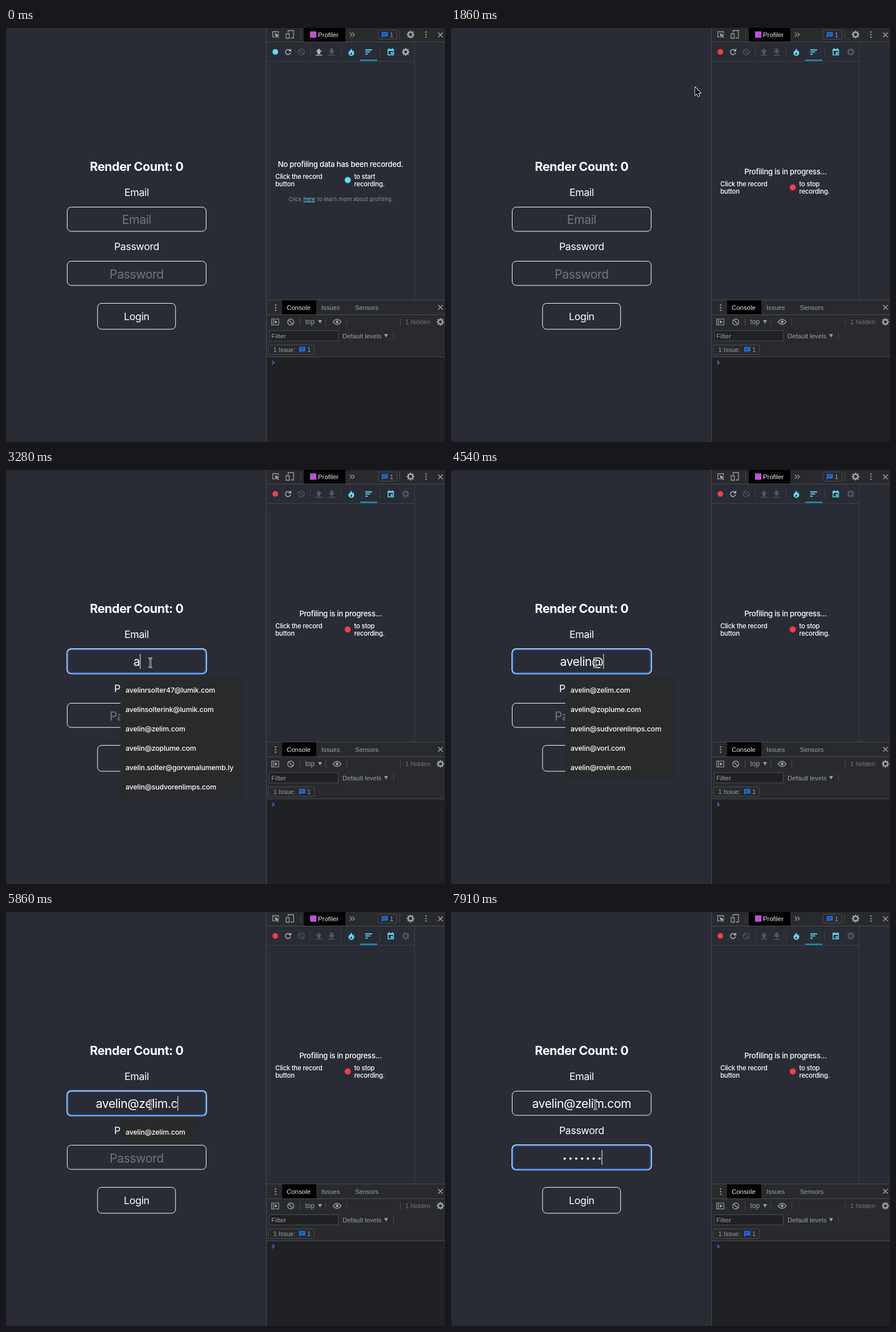
These frames come from a looping animation (771x727 px, 8 s). An HTML page with a canvas:

```html
<!DOCTYPE html>
<html lang="en">
<head>
<meta charset="utf-8">
<title>Login form profiling</title>
<style>
html, body { margin: 0; width: 100%; height: 100%; overflow: hidden; background: #292c34; }
canvas { display: block; }
</style>
</head>
<body>
<canvas id="stage" width="771" height="727"></canvas>
<script>
const c = document.getElementById('stage').getContext('2d');
const LOOP = 8000, MID = 229.4;
const UI = 'Inter, "Open Sans", sans-serif', DEV = '"Liberation Sans", Arial, sans-serif';
const BG = '#292c34', BAR = '#292a2d', EDGE = '#494c50', ICON = '#9aa0a6', CYAN = '#61dafb',
      RED = '#fc3a4b', GREY = '#afb3b9', DIM = '#4f5766', LINE = '#3d424a', BLUE = '#1a73e8';

// Typed address and the moment each character lands
const address = 'avelin@zelim.com';
const keys = [3280, 3370, 3550, 3730, 3910, 4000, 4450, 4980, 5160, 5250, 5420, 5510, 5680, 5860, 6040, 6130];
const dots = [6840, 6930, 7190, 7370, 7640, 7820, 7910];
const RECORD = 1590, FOCUS = 2560, TAB = 6210;

const [long1, long2, zelim, zoplume, dotted, films, vorl, rovim] = [
  'avelinrsolter47@lumik.com', 'avelinsolterink@lumik.com', 'avelin@zelim.com', 'avelin@zoplume.com',
  'avelin.solter@gorvenalumemb.ly', 'avelin@sudvorenlimps.com', 'avelin@vorl.com', 'avelin@rovim.com'];
const menus = [
  [2650, [long1, long2, zelim, zoplume, vorl, rovim], 389],
  [3280, [long1, long2, zelim, zoplume, dotted, films], 416],
  [4540, [zelim, zoplume, films, vorl, rovim], 393],
  [4980, [zelim, zoplume], 355],
  [5160, [zelim], 337],
  [TAB, [], 0]
];

function text(s, x, y, size, color, { font = DEV, align = 'left', weight = 400, gap = 0 } = {}) {
  c.font = `${weight} ${size}px ${font}`;
  c.letterSpacing = gap * size + 'px';
  c.textAlign = align;
  c.fillStyle = color;
  c.fillText(s, x, y);
  return c.measureText(s).width;
}
const page = (s, y, size, color = '#fff', weight = 400) =>
  text(s, MID, y, size, color, { font: UI, align: 'center', weight, gap: -.02 });
const panel = (s, x, y, size, gap = -.02, align = 'left') =>
  text(s, x, y, size, '#fff', { font: UI, gap, align, weight: 500 });
const hint = (s, x, color = '#8d929b') =>
  text(s, x, 304, 9.4, color, { font: UI, gap: .016 });

function rect(x, y, w, h, color) {
  c.fillStyle = color;
  c.fillRect(x, y, w, h);
}
function box(x, y, w, h, r, color, width = 1) {
  c.beginPath();
  c.roundRect(x, y, w, h, r);
  c.strokeStyle = color;
  c.lineWidth = width;
  c.stroke();
}
function fill(d, color) {
  c.fillStyle = color;
  c.fill(new Path2D(d));
}
function stroke(d, color, width = 1.3) {
  c.strokeStyle = color;
  c.lineWidth = width;
  c.stroke(new Path2D(d));
}
function disc(x, y, r, color) {
  c.beginPath();
  c.arc(x, y, r, 0, 7);
  c.fillStyle = color;
  c.fill();
}
function ring(x, y, r, color, width = 1.4) {
  c.beginPath();
  c.arc(x, y, r, 0, 7);
  c.strokeStyle = color;
  c.lineWidth = width;
  c.stroke();
}
function gear(x, y, r, color) {
  ring(x, y, r * .58, color, r * .38);
  for (let i = 0; i < 8; i++) {
    const a = i * Math.PI / 4, u = Math.cos(a), v = Math.sin(a);
    stroke(`M${x + u * r * .65} ${y + v * r * .65}L${x + u * r} ${y + v * r}`, color, r * .36);
  }
}
function ban(x, y, r, color) {
  ring(x, y, r, color);
  const d = r * .7;
  stroke(`M${x - d} ${y - d}L${x + d} ${y + d}`, color, 1.4);
}
const cross = (x, y) => stroke(`M${x - 4} ${y - 4}l8 8m0-8l-8 8`, ICON, 1.6);
const kebab = (x, y) => [-4.5, 0, 4.5].forEach(d => disc(x, y + d, 1.3, ICON));
const down = (x, y) => fill(`M${x - 3.5} ${y - 3}h7l-3.5 6z`, ICON);
function message(x, y) {
  fill(`M${x} ${y}h10.5v8h-8l-2.5 2.5z`, BLUE);
  stroke(`M${x + 2} ${y + 2.7}h6.5m-6.5 2.6h4.5`, BAR, 1);
}

function drawDevTools() {
  rect(457, 0, 314, 727, BAR);
  rect(458, 25, 313, 452, BG);

  // Top tab bar
  rect(458, 24, 313, 1, EDGE);
  stroke('M472 15.5h-3.5v-9h10v3', ICON);
  fill('M472 9l8.5 3.5-3.5 1.2 2.5 2.8-1.3 1.2-2.6-2.9-1.6 3.2z', ICON);
  stroke('M495.5 8v-3.5h9.5v13h-5M492 10h5.5v8h-5.5z', ICON);
  rect(517, 4, 1, 15, EDGE);
  rect(523, 0, 73, 24, '#000');
  rect(534, 6, 11, 11, '#c04fd8');
  text('Profiler', 548, 16, 11.4, '#e8eaed');
  stroke('M604 8l3.5 3.7-3.5 3.7m4.5-7.4l3.5 3.7-3.5 3.7', ICON, 1.2);
  box(653.5, 3.5, 33, 16, 2, EDGE);
  message(660, 7);
  text('1', 674, 16, 11.4, ICON);
  rect(691, 4, 1, 15, EDGE);
  gear(710.5, 11.5, 6.8, ICON);
  kebab(737.5, 11.5);
  cross(763, 12);

  // Drawer
  rect(458, 477, 313, 1, EDGE);
  rect(485, 478, 60, 25, '#000');
  rect(458, 503, 313, 1, EDGE);
  kebab(473.5, 491);
  text('Console', 493, 494.5, 11.4, '#e8eaed');
  text('Issues', 554, 494.5, 11.2, ICON);
  text('Sensors', 613, 494.5, 11.3, ICON);
  cross(763, 490.5);

  stroke('M466.5 511h12.5v10.5h-12.5zM469.5 511v10.5', ICON, 1.2);
  fill('M472 513l5 3.2-5 3.3z', ICON);
  ban(500, 516.3, 5.3, ICON);
  [516, 561, 598, 692].forEach(x => rect(x, 509, 1, 14, EDGE));
  text('top', 525.5, 520, 12, ICON);
  down(551.5, 516);
  stroke('M574.5 516q7-9 14 0q-7 9-14 0z', ICON, 1.5);
  disc(581.5, 516, 2.4, ICON);
  text('1 hidden', 701, 520, 11.6, '#72767b');
  gear(763, 516, 6.5, ICON);

  rect(462, 531, 121, 19, '#202124');
  box(462.5, 531.5, 121, 18, 0, EDGE);
  text('Filter', 466, 545, 11.6, ICON);
  text('Default levels', 591, 544.5, 11.4, ICON);
  down(667.5, 540.5);
  rect(680, 533, 1, 14, EDGE);
  box(460.5, 556.5, 81, 17, 2, EDGE);
  text('1 Issue:', 469.5, 569, 11, ICON);
  message(515, 560);
  text('1', 529, 569, 11.2, ICON);
  rect(458, 577, 313, 150, '#202124');
  rect(458, 577, 313, 1, EDGE);
  stroke('M467.5 584.3l3.5 3.2-3.5 3.2', '#367cf1', 1.6);
  rect(457, 0, 1, 727, EDGE);
}

function drawProfiler(t) {
  const live = t >= RECORD, idle = live ? DIM : GREY;
  rect(458, 58, 259, 1, LINE);
  rect(717, 25, 1, 452, LINE);
  disc(473, 42, 5, live ? RED : t >= 1230 ? '#a2e9fc' : CYAN);
  stroke('M499 39.5a4.5 4.5 0 1 0 .8 3.5', GREY, 1.5);
  fill('M501 36v5h-5z', GREY);
  ban(518.5, 42, 5.4, DIM);
  [534, 588, 656].forEach(x => rect(x, 34, 1, 17, LINE));
  fill('M549.5 36l5.5 5.5h-3v4.5h-5v-4.5h-3zM544 47h11v1.6h-11z', idle);
  fill('M569.5 36h5v4.5h3l-5.5 5.5-5.5-5.5h3zM566.5 47h11v1.6h-11z', DIM);
  fill('M606 36c.5 3-4.5 4.5-4.5 8a5 5 0 0 0 10 0c0-2.5-1.4-4-2-5-.2 1-.8 1.8-1.5 2 .3-2-.5-4-2-5z', CYAN);
  fill('M606.5 43c1.8 1 1.8 4-.2 4s-2-2.2 .2-4z', BG);
  stroke('M631 38.5h12m-12 3.7h8.5m-8.5 3.7h4.5', CYAN, 1.8);
  rect(622, 55.5, 30, 2.5, '#178fb9');
  stroke('M671 37.7h9.5v9.6h-9.5zM673 35.5v2m5.5-2v2', CYAN, 1.5);
  rect(670.5, 37, 10.5, 3, CYAN);
  rect(675.8, 42.3, 3.3, 3.3, CYAN);
  gear(702, 42, 6.5, idle);

  const y = live ? 277.5 : 264.5;
  panel(live ? 'Profiling is in progress...' : 'No profiling data has been recorded.',
    587.5, live ? 256.5 : 243.5, 13.2, -.022, 'center');
  panel('Click the record', 473, y, 11.4);
  panel('button', 473, y + 13, 11.4);
  disc(600.2, y + 2.5, 5.4, live ? RED : CYAN);
  panel(live ? 'to stop' : 'to start', 611.5, y, 11.4);
  panel('recording.', 611.5, y + 13, 11.4);
  if (!live) {
    hint('Click', 496.5);
    rect(522.5, 305, hint('here', 522.5, CYAN), 1, CYAN);
    hint('to learn more about profiling.', 546.5);
  }
}

function field(y, focused) {
  if (!focused) return box(107.5, y + .5, 244, 42.5, 7, '#fff');
  box(108.5, y + 1.2, 242, 41.3, 6, BLUE, 2);
  box(107, y - .2, 245.3, 44.2, 7.5, '#fff', 1.2);
}
const caret = (x, y) => rect(x, y, 1.2, 26, '#d8dade');
const count = (times, t) => times.filter(k => t >= k).length;

function drawForm(t) {
  const typed = count(keys, t), pass = count(dots, t);
  const inEmail = t >= FOCUS && t < TAB, inPass = t >= TAB;
  page('Render Count: 0', 251, 21.5, '#fff', 700);
  page('Email', 295, 17.7);
  page('Password', 390, 17.7);
  field(314, inEmail);
  field(409, inPass);
  box(160.8, 483.5, 137, 45.5, 7, '#fff');
  page('Login', 513, 17.8);

  const w = page(typed ? address.slice(0, typed) : 'Email', 344, 21.2, typed ? '#fff' : '#757575');
  // The caret blinks off after half a second without input
  const last = Math.max(FOCUS, ...keys.filter(k => t >= k));
  if (inEmail && t - last < 530) caret(typed ? MID + w / 2 : MID, 323);

  if (!pass) page('Password', 439.5, 21.2, '#757575');
  for (let i = 0; i < pass; i++) disc(MID + .8 + (i - (pass - 1) / 2) * 10.2, 433, 2.1, '#fff');
  if (pass || inPass && t < 6750) caret(pass ? MID - .6 + pass * 5.1 : MID, 418);
}

function drawMenu(t) {
  const menu = menus.filter(m => t >= m[0]).pop();
  if (!menu || !menu[1].length) return;
  const [, rows, right] = menu;
  c.save();
  c.shadowColor = 'rgba(0,0,0,.3)';
  c.shadowBlur = 2;
  rect(201, 366, right - 201, rows.length * 34 + 7, '#292a2c');
  c.restore();
  rows.forEach((s, i) => panel(s, 210, 391.3 + i * 34, 12.3, -.01));
}

function sprite(x, y, d, face, rim, width) {
  c.save();
  c.translate(x, y);
  c.lineJoin = 'round';
  stroke(d, rim, width);
  fill(d, face);
  c.restore();
}
function drawCursor(t) {
  if (t < 440) return;
  // The pointer is sampled about eleven times a second
  const step = (from, n, k = 0) => Math.min(1, (Math.floor((t - from) / 87.5) + k) / n);
  let x, y;
  if (t < 1770) {
    const p = step(440, 9), e = p * (2 - p);
    x = 64 + 408 * e;
    y = 178 - 132 * e;
  } else {
    const p = step(1770, 7, 1), e = p * p * (3 - 2 * p);
    x = 472 - 218.5 * e;
    y = 46 + 292 * e;
  }
  if (x > 462 && y < 56) {
    sprite(x, y, 'M-1 0q1.5-1.5 2.5 .5v5l1.5-.7 1.5 1 1.5-.4 1.3 1 1.5 .2v4l-1.5 4h-7.5l-4-5.5q-.5-2 1.5-1.5l1.7 1.5z',
      '#fff', '#111', 1.8);
    sprite(x, y, 'M1.5 9.5v3m2-3v3m2-3v3', '#333', '#333', .8);
  } else if (x > 107 && x < 352 && y > 314) {
    const beam = 'M-3.5-7.5q3 0 3.5 2q.5-2 3.5-2M0-5.5v12M-3.5 8.5q3 0 3.5-2q.5 2 3.5 2M-2 2.5h4';
    c.save();
    c.translate(x, y);
    stroke(beam, '#e4e4e4', 2.8);
    stroke(beam, '#111', 1);
    c.restore();
  } else {
    sprite(x, y, 'M0 0v14l3.2-3 2.2 5 2.3-1-2.2-4.8h4.5z', '#000', '#fff', 1.8);
  }
}

function frame() {
  const t = performance.now() % LOOP;
  rect(0, 0, 771, 727, BG);
  rect(0, 0, 1, 727, '#22252d');
  drawDevTools();
  drawProfiler(t);
  drawForm(t);
  drawMenu(t);
  drawCursor(t);
  requestAnimationFrame(frame);
}
frame();
</script>
</body>
</html>
```
